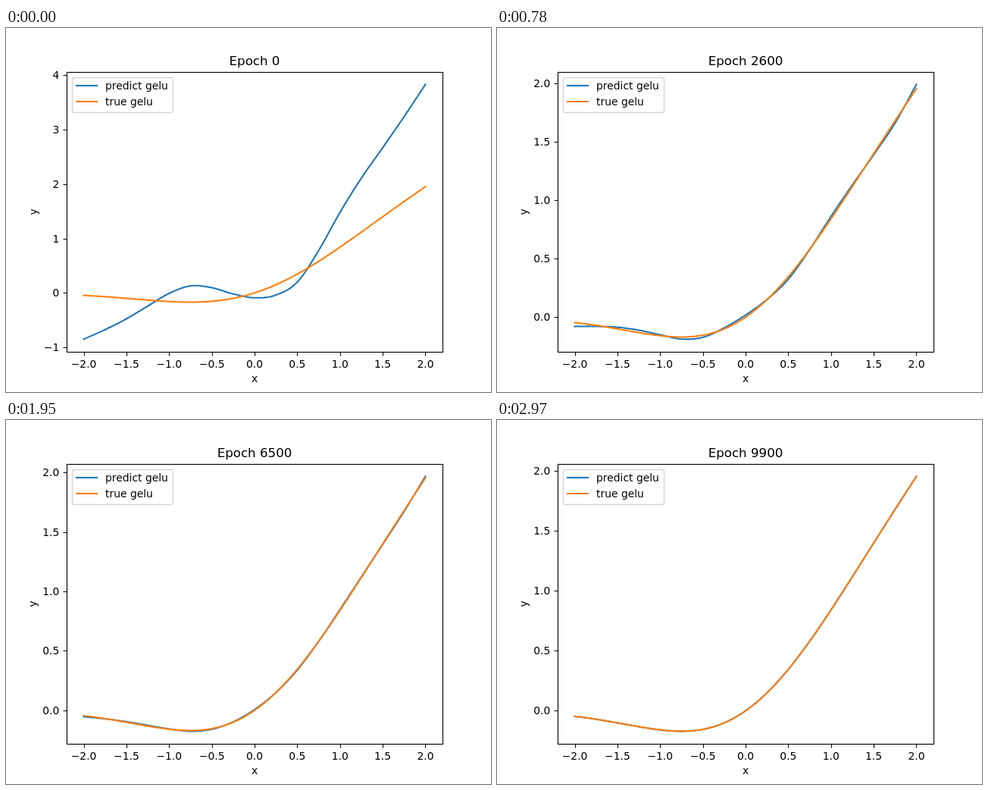
An HTML page that plays this animation: 640 by 480 pixels, repeating every 3 s.

```html
<!DOCTYPE html>
<html lang="en">
<head>
<meta charset="utf-8">
<title>Curve fitting</title>
<style>
  html, body { margin: 0; width: 100%; height: 100%; overflow: hidden; background: #fff; }
  svg { display: block; }
  text { font: 13.89px "DejaVu Sans", sans-serif; fill: #000; }
  .title { font-size: 16.67px; }
  .middle { text-anchor: middle; }
  .end { text-anchor: end; }
  .axis { fill: none; stroke: #000; stroke-width: 1.11; }
  .curve { fill: none; stroke-width: 2.083; stroke-linecap: square; stroke-linejoin: round; }
  .predict { stroke: #1f77b4; }
  .truth { stroke: #ff7f0e; }
</style>
</head>
<body>
<svg id="stage" width="640" height="480" viewBox="0 0 640 480">
  <rect width="640" height="480" fill="#fff"/>
  <path id="xTicks" class="axis"/>
  <g id="xLabels"></g>
  <path id="yTicks" class="axis"/>
  <g id="yLabels"></g>
  <path id="predict" class="curve predict"/>
  <path id="truth" class="curve truth"/>
  <rect class="axis" x="80.5" y="58.5" width="496" height="369" stroke-linejoin="miter"/>
  <text id="title" class="title middle" x="328" y="49"></text>
  <text class="middle" x="328" y="467">x</text>
  <text id="yName" class="middle">y</text>
  <rect x="87.5" y="65.5" width="133" height="46" rx="2.8" fill="#fff" fill-opacity=".8"
        stroke="#ccc" stroke-opacity=".8" stroke-width="1.39"/>
  <path class="curve predict" d="M93 76H120"/>
  <path class="curve truth" d="M93 97H120"/>
  <text x="131" y="81">predict gelu</text>
  <text x="131" y="102">true gelu</text>
</svg>
<script>
const $ = id => document.getElementById(id);
const STEP_MS = 30, STEPS = 100, SAMPLES = 200;
const TOP = 74.4, SPAN = 336, MARGIN = 0.05;

// Prediction error at x = -2, -1.75 ... 2
const initial = [-.807, -.606, -.377, -.11, .149, .298, .249, .08, -.09,
                 -.19, -.146, .2, .639, .992, 1.27, 1.56, 1.879];
const wavy = [-.0515, -.015, .018, .032, .016, -.02, -.024, .015, .026,
              .005, -.021, -.002, .019, .012, -.009, -.016, .027];
const calmer = [-.0345, -.009, .014, .021, .009, -.017, -.018, .009, .018,
                .001, -.021, -.002, .02, .013, -.01, -.02, .0365];
const late = [-.0185, -.0035, .009, .012, .004, -.0115, -.01, .006, .012,
              0, -.014, -.001, .013, .009, -.007, -.014, .0265];
const scaled = k => late.map(v => v * k);
const stages = [[12, wavy], [26, calmer], [50, late], [65, scaled(.5)], [81, scaled(.08)], [99, scaled(.01)]];

const mix = (a, b, t) => a.map((v, i) => v + (b[i] - v) * t);
const snap = v => Math.floor(v + .5) + .5;
const px = x => 328 + x * 112.727;
const label = (v, digits) => (v < 0 ? '\u2212' : '') + Math.abs(v).toFixed(digits);
const text = (x, y, anchor, s) => `<text class="${anchor}" x="${x}" y="${y}">${s}</text>`;

const gelu = x => x / 2 * (1 + Math.tanh(Math.sqrt(2 / Math.PI) * (x + .044715 * x ** 3)));

function errorAt(step) {
  if (step < 12) return mix(wavy, initial, .35 ** step);
  const i = Math.max(1, stages.findIndex(s => s[0] >= step));
  const [t0, a] = stages[i - 1], [t1, b] = stages[i];
  return mix(a, b, (step - t0) / (t1 - t0));
}

// Catmull-Rom through evenly spaced knots
function spline(knots, x) {
  const u = (x + 2) * 4, n = knots.length - 1;
  const i = Math.min(n - 1, Math.floor(u)), t = u - i;
  const b = knots[i], c = knots[i + 1];
  const a = i > 0 ? knots[i - 1] : 2 * b - c;
  const d = i + 2 <= n ? knots[i + 2] : 2 * c - b;
  return b + t / 2 * (c - a + t * (2 * a - 5 * b + 4 * c - d + t * (3 * (b - c) + d - a)));
}

const xs = Array.from({ length: SAMPLES + 1 }, (_, i) => -2 + 4 * i / SAMPLES);
const truth = xs.map(gelu);

let xTicks = '', xLabels = '';
for (let x = -2; x <= 2; x += .5) {
  xTicks += `M${snap(px(x))} 427.5v5`;
  xLabels += text(px(x), 448, 'middle', label(x, 1));
}
$('xTicks').setAttribute('d', xTicks);
$('xLabels').innerHTML = xLabels;

function draw(step) {
  const error = errorAt(step);
  const predict = xs.map((x, i) => truth[i] + spline(error, x));
  const all = predict.concat(truth);
  const low = Math.min(...all), high = Math.max(...all), range = high - low;
  const py = y => TOP + (high - y) / range * SPAN;
  const path = ys => 'M' + ys.map((y, i) => px(xs[i]).toFixed(2) + ' ' + py(y).toFixed(2)).join('L');
  $('predict').setAttribute('d', path(predict));
  $('truth').setAttribute('d', path(truth));

  const gap = range * (1 + 2 * MARGIN) > 4.5 ? 1 : .5, digits = gap < 1 ? 1 : 0;
  const first = Math.ceil((low - MARGIN * range) / gap);
  const last = Math.floor((high + MARGIN * range) / gap);
  let ticks = '', labels = '';
  for (let k = first; k <= last; k++) {
    const y = py(k * gap);
    ticks += `M75.5 ${snap(y)}h5`;
    labels += text(70.3, Math.round(y + 5), 'end', label(k * gap, digits));
  }
  $('yTicks').setAttribute('d', ticks);
  $('yLabels').innerHTML = labels;

  // The axis name sits left of the widest tick label
  const widest = (digits ? 22.1 : 8.84) + (first < 0 ? 11.64 : 0);
  $('yName').setAttribute('transform', `translate(${Math.round(61.7 - widest)} 242.4) rotate(-90)`);
  $('title').textContent = 'Epoch ' + step * 100;
}

let start, shown = -1;
function tick(now) {
  start ??= now;
  const step = Math.floor((now - start) / STEP_MS) % STEPS;
  if (step !== shown) draw(shown = step);
  requestAnimationFrame(tick);
}
draw(0);
requestAnimationFrame(tick);
</script>
</body>
</html>
```
